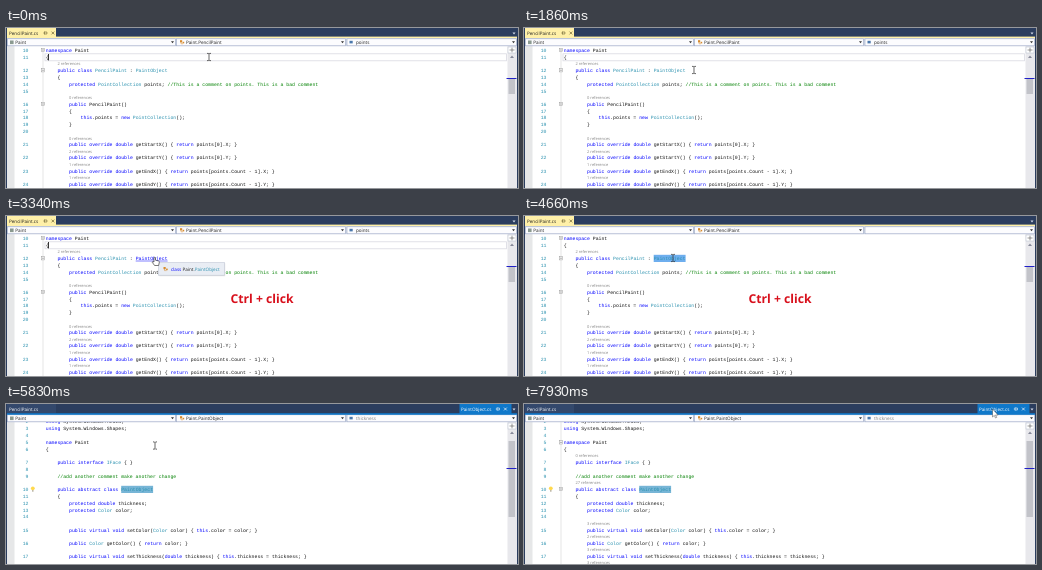
Write an HTML page that moves like this. It is 512 px wide and 160 px high and loops after 8 s.

```html
<!DOCTYPE html>
<html lang="en">
<head>
<meta charset="utf-8">
<title>Go to definition</title>
<style>
html, body { margin: 0; width: 100%; height: 100%; overflow: hidden; background: #fff; }
svg { display: block; width: 512px; height: 160px; }
text { white-space: pre; text-rendering: geometricPrecision; font: 4.6px "Open Sans", sans-serif; fill: #1e1e1e; }
.code { font: 4.83px "Liberation Mono", monospace; fill: #111; }
.key { fill: #00f; }
.type, .num { fill: #2b91af; }
.note { fill: #008000; }
.lens { font-size: 4px; fill: #858585; }
.num { text-anchor: end; }
.light { fill: #fff; }
#hint { font: bold 12.2px "Open Sans", sans-serif; fill: #d8101c; }
</style>
</head>
<body>
<svg id="stage" viewBox="0 0 512 160"></svg>
<script>
const CHAR = 2.9, LEFT = 39.8, FRAME = '#2b3d5e', ACTIVE = '#0f78ca';
const col = n => LEFT + n * CHAR;
const rect = (x, y, w, h, fill, more = '') =>
  `<rect x="${x}" y="${y}" width="${w}" height="${h}" fill="${fill}" ${more}/>`;
const text = (x, y, body, cls = '') => `<text x="${x}" y="${y}" class="${cls}">${body}</text>`;
const line = (d, color, width = .6) =>
  `<path d="${d}" fill="none" stroke="${color}" stroke-width="${width}"/>`;
const group = (id, body) => `<g id="${id}">${body}</g>`;

const syntax = /(\/\/.*)|\b(namespace|using|public|protected|class|interface|abstract|override|virtual|void|double|return|this|new)\b|\b(PaintObject|PointCollection|IFace|Color|PencilPaint(?!\())\b/g;
const paint = s => s.replace(syntax, (word, note, key) =>
  `<tspan class="${note ? 'note' : key ? 'key' : 'type'}">${word}</tspan>`);

// Lines marked with ~ are reference counts and take no line number.
function listing(y, number, source) {
  let code = '', lens = '';
  for (const row of source.split('\n')) {
    const body = row.trim(), x = col(row.length - row.trimStart().length);
    if (body[0] === '~') {
      lens += text(x, y + 1, body.slice(1), 'lens');
      y += 6.2;
    } else {
      code += text(22.5, y + 1.5, number++, 'code num') + text(x, y + 1.5, paint(body), 'code');
      y += 6.9;
    }
  }
  return { code, lens };
}

const fold = y => rect(35.3, y - 1.7, 3.4, 3.4, '#fff', 'stroke="#999" stroke-width=".5"') +
  line(`M36 ${y}h2`, '#555', .5);
const folds = (top, ys) => line(`M37 ${top}V160`, '#c8c8c8', .5) + ys.map(fold).join('');
const classIcon = (x, y) => rect(x - 2, y - 2, 2.2, 2.2, '#d78a2c') + rect(x + .6, y - .4, 1.6, 1.6, '#d78a2c') +
  line(`M${x - 1} ${y}v1.6h2`, '#d78a2c', .5);
const pinAndCross = (x, color) => line(`M${x - 1} 3.5v3M${x - 1} 4h2.4v2h-2.4M${x - 2.2} 5h1.2`, color, .6) +
  line(`M${x + 6} 3.6l2.8 2.8m0-2.8l-2.8 2.8`, color, .7);
const thumb = (y, h, mark) => rect(502.5, y, 6.5, h, '#c2c3c9') + rect(500.5, mark, 10, 1, '#2020c8');

const first = listing(22.3, 10, `namespace Paint
{
    ~2 references
    public class PencilPaint : PaintObject
    {
        protected PointCollection points; //This is a comment on points. This is a bad comment

        ~0 references
        public PencilPaint()
        {
            this.points = new PointCollection();
        }

        ~0 references
        public override double getStartX() { return points[0].X; }
        ~2 references
        public override double getStartY() { return points[0].Y; }
        ~1 reference
        public override double getEndX() { return points[points.Count - 1].X; }
        ~1 reference
        public override double getEndY() { return points[points.Count - 1].Y; }`);

const second = listing(17.7, 2, `using System.Windows.Media;
using System.Windows.Shapes;

namespace Paint
{
    ~0 references
    public interface IFace { }

    //add another comment make another change
    ~27 references
    public abstract class PaintObject
    {
        protected double thickness;
        protected Color color;

        ~3 references
        public virtual void setColor(Color color) { this.color = color; }
        ~2 references
        public Color getColor() { return color; }
        ~3 references
        public virtual void setThickness(double thickness) { this.thickness = thickness; }
        ~3 references`);

const linkX = col(31), wordW = 11 * CHAR;
const stage = document.getElementById('stage');
stage.innerHTML =
  rect(0, 0, 512, 160, '#fff') + rect(0, 18, 8.5, 142, '#e6e7e8') +
  rect(501.5, 18, 10.5, 142, '#e8e8ec') +
  rect(502, 19, 8, 6, '#fff', 'stroke="#b4bccb" stroke-width=".5"') +
  line('M503.5 22h5M506 19.700v4.600', '#555') + '<path d="M504 30h4l-2-2.500z" fill="#868999"/>' +
  group('viewA',
    group('current', rect(39, 25.8, 461.5, 7, 'none', 'stroke="#d9d9e2" stroke-width=".8"')) +
    group('pick', rect(linkX, 38.8, wordW, 7.2, '#6eaeee')) +
    first.code + first.lens + folds(22, [22, 42.2, 76]) +
    group('link', rect(linkX, 39, wordW, 7, '#fff') +
      `<text x="${linkX}" y="43.8" class="code key">PaintObject</text>` + line(`M${linkX} 45h${wordW}`, '#00f', .5)) +
    thumb(50, 16, 50)) +
  group('viewB',
    rect(col(26), 81.8, wordW, 7.2, '#77b5d6') + second.code +
    group('lenses', second.lens + folds(18, [38.3, 85])) +
    group('bulb', '<circle cx="26.800" cy="84.300" r="1.900" fill="#ffd94f"/>' + rect(26.1, 86.2, 1.4, 1.4, '#a9a08a')) +
    thumb(37, 76, 64)) +
  group('caretA', rect(42.2, 26, .8, 6.4, '#000')) +
  group('caretB', rect(147.2, 82, .8, 6.6, '#000')) +
  rect(0, 0, 512, 10, FRAME) + rect(0, 10, 1, 150, FRAME) + rect(511, 10, 1, 150, FRAME) +
  rect(1, 10, 510, 8.2, '#d6dce9') +
  [[1.5, 168], [170.5, 169], [341, 169.5]].map(([x, w]) =>
    rect(x, 10.8, w, 7, '#fcfcfe', 'stroke="#9aa7c4" stroke-width=".6"') +
    `<path d="M${x + w - 4.5} 13.300h3l-1.500 2z" fill="#333"/>`).join('') +
  group('tabA', rect(1, 8.6, 510, 1.4, '#fff0a8') + rect(1, 0, 49, 10, '#fff0a8') +
    text(3, 6.7, 'PencilPaint.cs') + pinAndCross(39.5, '#6b5f30')) +
  group('tabB', rect(1, 0, 49, 9, '#33486c') + text(3, 6.7, 'PencilPaint.cs', 'light') +
    rect(1, 9.2, 510, 1.6, ACTIVE) + rect(453.5, 0, 52, 10, ACTIVE) +
    text(455, 6.7, 'PaintObject.cs', 'light') + pinAndCross(492, '#fff')) +
  '<path d="M506.500 4.500h3l-1.500 2z" fill="#d5dcea"/>' +
  rect(4, 12.5, 3.6, 3.6, '#8b9a90') + text(9.3, 15.8, 'Paint') + classIcon(176, 14.2) +
  text(180, 15.8, '', 'scope') +
  group('member', rect(343.5, 12.8, 3.2, 2.6, '#4a78ac') + text(350, 15.8, '', 'field')) +
  group('tip', rect(153.2, 47.2, 66, 13, '#000', 'opacity=".12"') +
    rect(152.4, 46.4, 66, 12.8, '#e9edf4', 'stroke="#c3cad8" stroke-width=".6"') + classIcon(159.5, 53) +
    text(165, 54.5, '<tspan class="key">class</tspan> Paint.<tspan class="type">PaintObject</tspan>')) +
  '<text id="hint" x="224.500" y="87">Ctrl + click</text>' +
  group('cursor',
    group('beam', line('M-2-3.600h1.400l.6.6.6-.6H2M0-3V3M-2 3.600h1.400l.6-.6.6.6H2', '#333', .75)) +
    group('hand', '<path d="M-1-3.500q1-1 1.500.2V-.8l3 .7q1 .3.8 1.500L3.600 4.500H-.4L-2.800 1.200q0-1.200 1.800-.2z" fill="#fff" stroke="#222" stroke-width=".6"/>') +
    group('arrow', '<path d="M-2-4V4L-.2 2.400 1 5l1.200-.6L1 2h2.600z" fill="#fff" stroke="#222" stroke-width=".4"/>'));

const $ = id => document.getElementById(id);
const scope = stage.querySelector('.scope'), field = stage.querySelector('.field');
const show = (id, on) => $(id).setAttribute('opacity', +on);
const ramp = (t, a, b) => Math.min(1, Math.max(0, (t - a) / (b - a)));

const blinks = [380, 930, 1470, 2000, 2530, 3040, 3590, 4120, 4660, 5300, 5830, 6360, 6890, 7420, 7930];
const path = [[0, 203, 29], [1250, 203, 29], [1860, 170, 42], [2030, 160, 42], [2100, 160, 42],
  [2500, 149, 45], [4350, 149, 45], [4510, 149, 42], [6080, 149, 41.5], [6680, 304, 52],
  [6850, 304, 52], [7000, 425.6, 44], [7620, 470.5, 9], [8000, 470.5, 9]];

function place(t) {
  const i = path.findIndex(p => p[0] > t);
  const [t0, x0, y0] = path[i - 1], [t1, x1, y1] = path[i];
  const u = ramp(t, t0, t1), e = u * u * (3 - 2 * u);
  return `translate(${x0 + (x1 - x0) * e} ${y0 + (y1 - y0) * e})`;
}

function draw(t) {
  const inB = t >= 4830, blink = blinks.filter(b => b <= t).length % 2 === 0;
  const linked = t >= 3340 && t < 4350, onTab = t >= 7500;
  show('viewA', t < 4910);
  show('viewB', t >= 4910);
  show('tabA', !inB);
  show('tabB', inB);
  show('current', t < 4350);
  show('pick', t >= 4350);
  show('link', linked);
  show('tip', t >= 2740 && t < 3660);
  show('hint', inB ? 0 : ramp(t, 2100, 2450));
  show('caretA', blink && t < 4350);
  show('caretB', blink && t >= 5060);
  show('bulb', t >= 5210);
  show('lenses', ramp(t, 6080, 6350));
  show('member', t < 4430 || t >= 5060);
  scope.textContent = inB ? 'Paint.PaintObject' : 'Paint.PencilPaint';
  field.textContent = inB ? 'thickness' : 'points';
  field.style.fill = inB ? '#808080' : '';
  $('cursor').setAttribute('transform', place(t));
  show('hand', linked);
  show('arrow', onTab);
  show('beam', !linked && !onTab);
}

const start = performance.now();
function tick() {
  draw((performance.now() - start) % 8000);
  requestAnimationFrame(tick);
}
tick();
</script>
</body>
</html>
```
